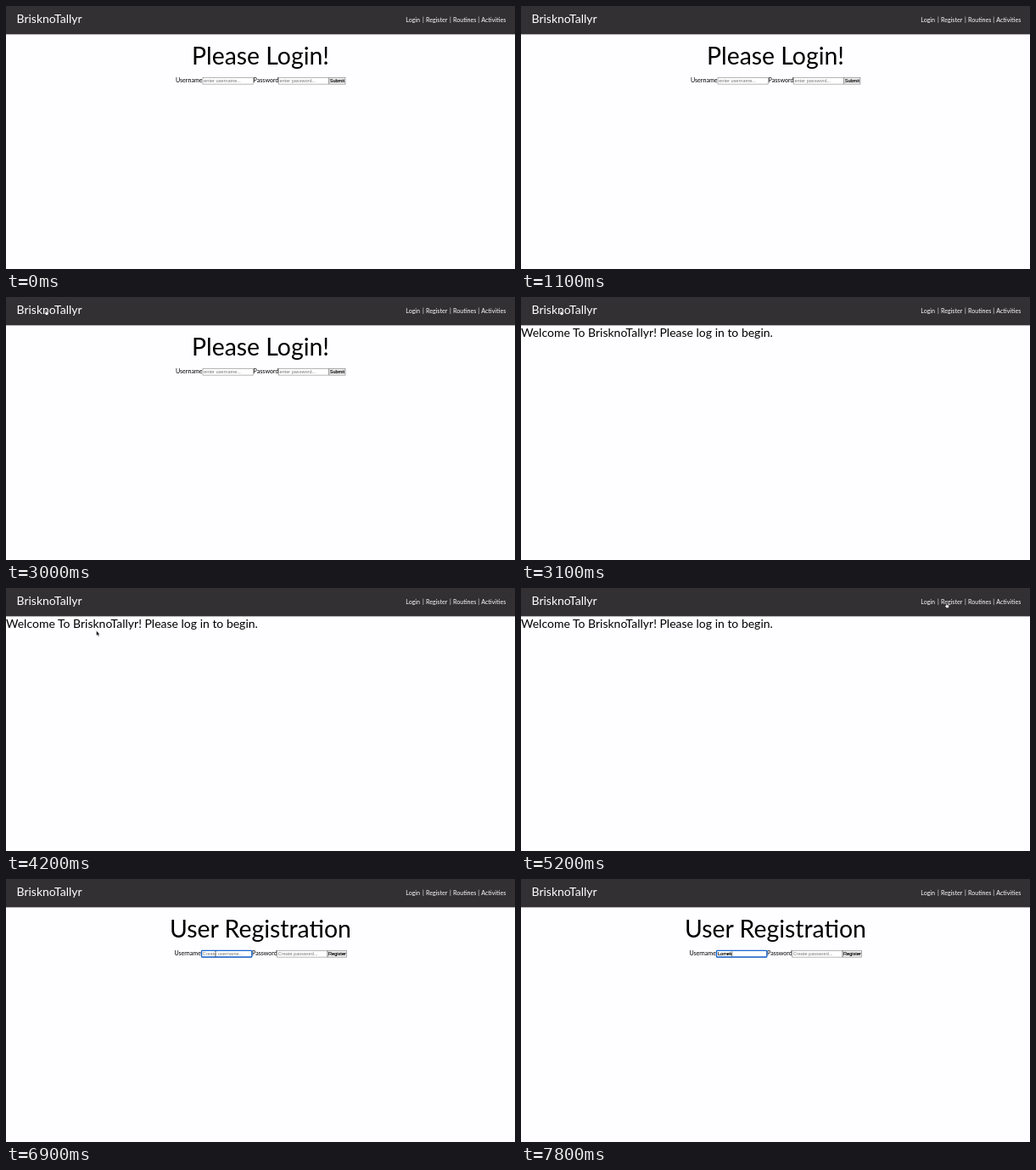
Recreate the animation shown at these times as an HTML page. Size 600 by 310 pixels, loop 8000 ms.

```html
<!DOCTYPE html>
<html lang="en">
<head>
<meta charset="utf-8">
<title>Workout log</title>
<style>
  html, body { margin: 0; width: 100%; height: 100%; overflow: hidden; background: #fefdff; }
  svg { display: block; width: 600px; height: 310px; font: 7.1px Lato, sans-serif; }
  .brand { font-size: 14px; }
  .title { font-size: 28.4px; text-anchor: middle; }
  .field { font: 5.58px "Liberation Sans", Arial, sans-serif; }
  .hint { fill: #757575; }
  .box { fill: #fff; stroke: #858585; stroke-width: .6; }
  .button { fill: #efefef; stroke: #777; stroke-width: .6; }
  .label { stroke: #000; stroke-width: .15; }
</style>
</head>
<body>
<svg id="stage" viewBox="0 0 600 310"></svg>
<script>
const LOOP = 8000, STEP = 100;
const BRAND = "BrisknoTallyr", USER = "Lomek";
const stage = document.getElementById("stage");

const text = (x, y, str, cls = "") => `<text x="${x}" y="${y}" class="${cls}">${str}</text>`;
const rect = (x, w, cls) => `<rect x="${x}" y="84.4" width="${w}" height="7.7" class="${cls}"/>`;

function form(id, title, x, verb, action, buttonWidth) {
  const user = x + 32, label = user + 59.6, pass = label + 29.6, button = pass + 59.6;
  return `<g id="${id}">` + text(300, 68.5, title, "title") +
    text(x, 90, "Username") + rect(user, 59.2, "box") +
    `<g class="user">${text(user + 1.2, 90.1, verb + " username...", "field hint")}</g>` +
    text(label, 90, "Password") + rect(pass, 59.2, "box") +
    text(pass + 1.2, 90.1, verb + " password...", "field hint") +
    rect(button, buttonWidth, "button") + text(button + .9, 90.1, action, "field label") + `</g>`;
}

const links = [[471.3, "Login"], [491, "|"], [495, "Register"], [523, "|"],
  [527, "Routines"], [556.3, "|"], [560.2, "Activities"]];

stage.innerHTML = `
  <rect width="600" height="310" fill="#fefdff"/>
  <rect width="600" height="33.4" fill="#333033"/>
  <g fill="#fff">${text(12.5, 19.6, BRAND, "brand")}${links.map(([x, s]) => text(x, 19, s)).join("")}</g>
  ${form("login", "Please Login!", 200, "enter", "Submit", 19.2)}
  <g id="home">${text(0, 47, `Welcome To ${BRAND}! Please log in to begin.`, "brand")}</g>
  ${form("register", "User Registration", 198.4, "Create", "Register", 22.2)}
  <g id="focus">
    <rect x="230.5" y="84.4" width="59.4" height="7.6" rx=".9" fill="none" stroke="#1767cf" stroke-width="1.3"/>
    <text id="typed" x="232" y="90.1" class="field label"></text>
    <rect id="caret" y="85.4" width=".5" height="5.8"/>
  </g>
  <g id="cursor">
    <path id="arrow" d="M0 0V6L1.4 4.8 2.3 6.9 3.3 6.5 2.4 4.4H4.2Z" stroke="#fff" stroke-width=".45"/>
    <path id="hand" d="M1.5 .4Q2.3 0 2.4 1V2.6L4.6 3.1Q5.3 3.4 5 4.6L4.5 6.3H2L.2 4Q0 3.2 1.4 3.7Z" fill="#fff" stroke="#000" stroke-width=".4"/>
    <path id="beam" d="M-1-3H1M0-3V3M-1 3H1" fill="none" stroke="#333" stroke-width=".5"/>
  </g>`;

const el = id => document.getElementById(id);
const show = (node, on) => node.setAttribute("visibility", on ? "inherit" : "hidden");

// Pointer stops: time, x, y
const stops = [[1800, 340, 148], [1900, 341, 135], [2100, 343, 107.6], [2300, 343, 107.6],
  [3000, 45, 15], [3400, 45, 15], [3800, 88, 50], [4100, 88, 50], [4200, 106.5, 50.3],
  [4300, 347.3, 67], [4500, 347.3, 67], [5300, 506.3, 15], [5700, 506.3, 15],
  [6300, 247, 88.2], [LOOP, 247, 88.2]];

function pointerAt(t) {
  const i = Math.max(1, stops.findIndex(s => s[0] >= t));
  const [t0, x0, y0] = stops[i - 1], [t1, x1, y1] = stops[i];
  const p = Math.max(0, (t - t0) / (t1 - t0)), k = p * p * (3 - 2 * p);
  return [x0 + (x1 - x0) * k, y0 + (y1 - y0) * k];
}

const keyTimes = [7200, 7400, 7500, 7600, 7800];

function draw(t) {
  show(el("login"), t < 3100);
  show(el("home"), t >= 3100 && t < 5500);
  show(el("register"), t >= 5500);

  const typing = t >= keyTimes[0], typed = el("typed");
  show(el("register").querySelector(".user"), t >= 5500 && !typing);
  show(el("focus"), t >= 6400);
  typed.textContent = USER.slice(0, keyTimes.filter(k => k <= t).length);
  el("caret").setAttribute("x", 231.8 + (typing ? typed.getComputedTextLength() : 0));
  show(el("caret"), t >= 6400 && (t < 6900 || typing));

  const [x, y] = pointerAt(t), visible = t >= 1900 && !typing;
  const onLink = y < 23 && (x < 94 || x > 470);
  const onField = t >= 5500 && y > 84 && x > 230 && x < 290;
  el("cursor").setAttribute("transform", `translate(${x} ${y})`);
  show(el("hand"), visible && onLink);
  show(el("beam"), visible && onField);
  show(el("arrow"), visible && !onLink && !onField);
}

function tick() {
  draw(Math.floor(performance.now() % LOOP / STEP) * STEP);
  requestAnimationFrame(tick);
}
tick();
</script>
</body>
</html>
```
